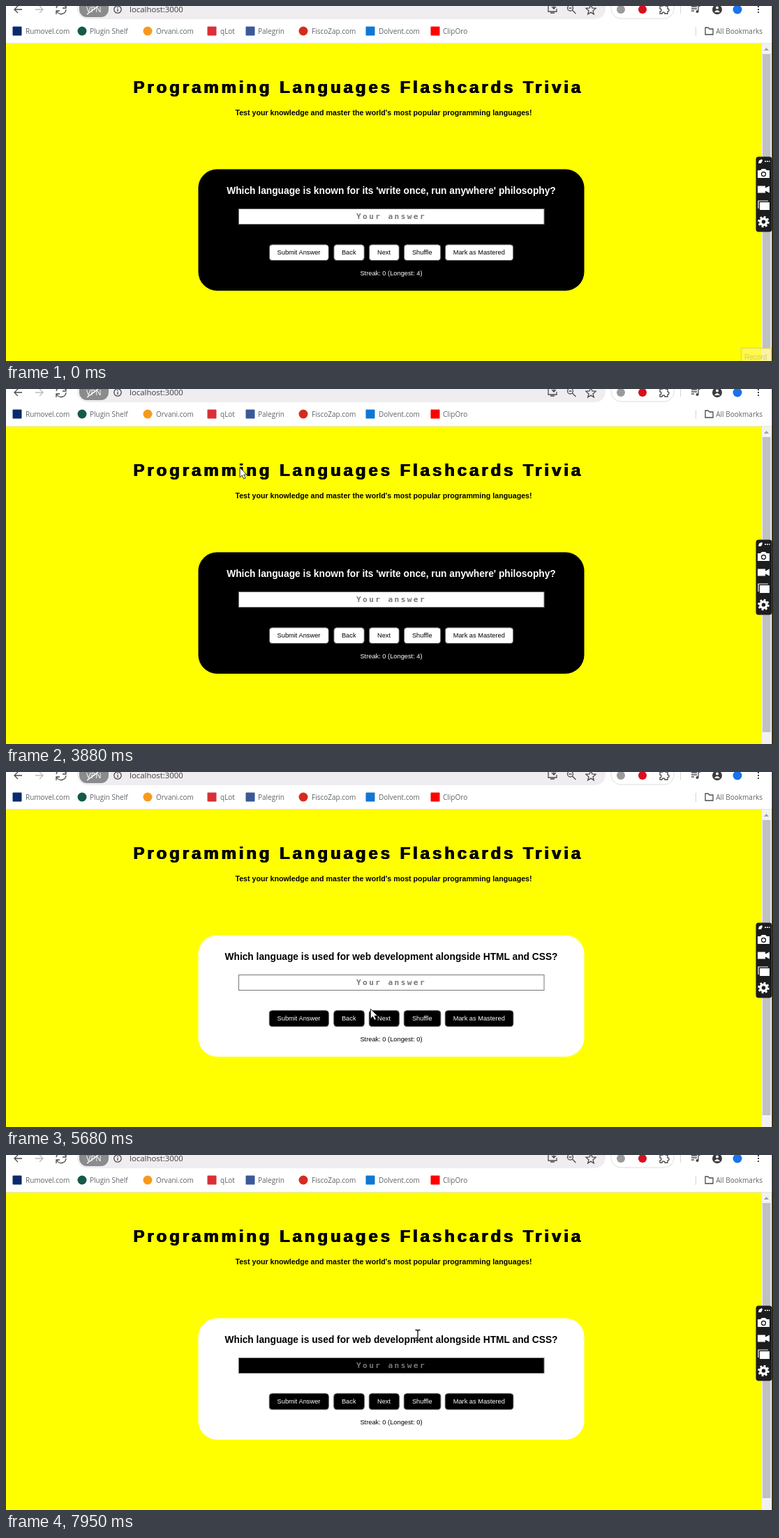
An HTML page that plays this animation: 1099 by 510 pixels, repeating every 8000 ms.

```html
<!DOCTYPE html>
<html lang="en">
<head>
<meta charset="utf-8">
<title>Programming Languages Flashcards Trivia</title>
<style>
  html, body { margin: 0; height: 100%; overflow: hidden; background: #ff0; }
  svg { display: block; width: 100vw; height: 100vh; }
  text { font-family: "Liberation Sans", Arial, sans-serif; white-space: pre; }
  .ui text { font: 10px "Open Sans", "Noto Sans", sans-serif; fill: #5f6368; }
  .ui .url { font-size: 11.4px; fill: #3c3c40; }
  .line { fill: none; stroke: #4a4a4e; stroke-width: 1.3; }
  .pixel { font-family: "DejaVu Sans Mono", monospace; font-weight: bold; }
  #heading { font-size: 24px; letter-spacing: 3.91px; }
  #placeholder { font-size: 11.2px; letter-spacing: 2.36px; fill: #757575; }
  .bold { font-weight: bold; }
  .mid { text-anchor: middle; }
  #card { --back: #000; --ink: #fff; --edge: #444; }
  #card.lit { --back: #fff; --ink: #000; --edge: #555; }
  #card > rect { fill: var(--back); }
  #card > text { fill: var(--ink); }
  #question { font-size: 13.78px; }
  #streak, .button text { font-size: 9.27px; }
  .button rect { fill: var(--ink); stroke: var(--edge); }
  .button text { fill: var(--back); }
  #card #field { fill: #fff; stroke: #777; }
  #card.dark #field { fill: #000; }
  .tool { fill: #fff; }
</style>
</head>
<body>
<svg viewBox="0 0 1099 510">
  <rect width="1099" height="510" fill="#ff0"/>

  <g class="ui">
    <rect width="1099" height="54" fill="#fff"/>
    <path d="M0 53.5H1099" stroke="#e6e6e0"/>
    <rect x="102" y="-16" width="757" height="35" rx="15" fill="#efedf0"/>
    <rect x="105" y="-12" width="42" height="28" rx="11" fill="#8b8b8d"/>
    <text x="115" y="9" style="fill:#fff;font-size:11px">VPN</text>
    <path d="M116 12L136-3" stroke="#fff" stroke-width="1.4"/>
    <path class="line" d="M23 5H12M17 0L12 5l5 5"/>
    <path class="line" style="stroke:#bbb" d="M42 5H53M48 0l5 5-5 5"/>
    <path class="line" d="M72 3a7 7 0 0 1 13-2M86 5a7 7 0 0 1-13 3M86-2V3H81M72 12V7h5"/>
    <circle class="line" cx="160" cy="5" r="5.2"/>
    <path class="line" d="M160 4V8M160 1.5V3"/>
    <text class="url" x="177" y="9">localhost:3000</text>
    <path class="line" d="M780-1h-3V8h12V4M780 10h6M785-3V4M782 1l3 3 3-3"/>
    <circle class="line" cx="808.5" cy="3" r="4"/>
    <path class="line" d="M811.500 6l5 5M806.500 3h4"/>
    <path class="line" d="M838-2l2 5 5 .4-4 3.500 1.300 5-4.300-2.800-4.300 2.800 1.300-5-4-3.500 5-.4z"/>
    <rect x="867" y="-14" width="90" height="32" rx="14" fill="none" stroke="#ddd"/>
    <circle cx="881" cy="5" r="6" fill="#9a9a9c"/>
    <circle cx="912" cy="5" r="6" fill="#d80f1e"/>
    <path class="line" d="M937 0h4a2 2 0 0 1 4 0h3v4a2 2 0 0 1 0 4v3h-4a2 2 0 0 0-4 0h-3V8a2 2 0 0 0 0-4z"/>
    <path d="M966.5 0V11M988.5 30V43" stroke="#d5d5d8"/>
    <path class="line" d="M982 1h8M982 4h8M982 7h4M992 8V0h3"/>
    <circle cx="990.500" cy="8" r="2" fill="#4a4a4e"/>
    <circle cx="1019" cy="5" r="7" fill="#3b3b3e"/>
    <circle cx="1019" cy="2.500" r="2" class="tool"/>
    <path class="tool" d="M1015 9q4-6 8 0z"/>
    <circle cx="1048" cy="5" r="6.500" fill="#1a73e8"/>
    <path d="M1077 0h2v2h-2zM1077 4h2v2h-2zM1077 8h2v2h-2z" fill="#444"/>
    <g id="bookmarks"></g>
    <path class="line" d="M1002 41V31h4l2 2h5v8z"/>
    <text x="1084" y="39.500" text-anchor="end">All Bookmarks</text>
  </g>

  <rect x="1083" y="54" width="14" height="456" fill="#f1f1f1"/>
  <rect x="1084" y="69" width="11.500" height="424" fill="#c1c1c1"/>
  <path d="M1086 64l3.500-4 3.500 4z" fill="#a0a0a0"/>
  <rect x="1097.500" width="1.500" height="510" fill="#111"/>

  <g id="title" class="pixel">
    <text id="heading" x="182.500" y="125">Programming Languages Flashcards Trivia</text>
    <use href="#heading" x=".6"/><use href="#heading" x="-.6"/>
  </g>
  <text id="subtitle" class="bold mid" x="541" y="157" font-size="10.67">Test your knowledge and master the world's most popular programming languages!</text>

  <g id="card">
    <rect x="275.500" y="234.500" width="553" height="174.500" rx="27"/>
    <text id="question" class="bold mid" x="552" y="270"></text>
    <rect id="field" x="333.500" y="291.500" width="437.500" height="22"/>
    <text id="placeholder" class="pixel" x="502" y="306" style="fill:#777">Your answer</text>
    <g id="buttons"></g>
    <text id="streak" class="mid" x="552" y="386.500"></text>
  </g>

  <g id="record">
    <rect x="1053.500" y="491.500" width="43" height="22" fill="#fff67a" fill-opacity=".6" stroke="#ddd36a"/>
    <text x="1058" y="508" font-size="10" fill="#d6c95c">Record</text>
  </g>
  <rect x="1074.500" y="216.500" width="23" height="108" rx="4" fill="#1d1d1f"/>
  <g class="tool">
    <path d="M1078 226l1-4 4-2 1 2-2 4zM1087 222.500h2v1.500h-2zM1090 222.500h2v1.500h-2zM1093 222.500h1.500v1.500h-1.500z"/>
    <path d="M1077 236h4l2-2h5l2 2h4v11h-17z"/>
    <circle cx="1085.500" cy="241.500" r="3" stroke="#1d1d1f" stroke-width="1.300"/>
    <path d="M1077 258.500h11v3l6-3v10l-6-3v3h-11z"/>
    <path d="M1080 282h14v11h-14z"/>
    <path d="M1078 291V280h14" fill="none" stroke="#fff" stroke-width="1.200"/>
    <circle cx="1085.500" cy="310" r="4.500" fill="none" stroke="#fff" stroke-width="3.500"/>
    <circle cx="1085.500" cy="310" r="7" fill="none" stroke="#fff" stroke-width="2.500" stroke-dasharray="2.800 2.700"/>
  </g>

  <g id="cursor">
    <path id="arrow" d="M0 0V14L3.200 11 5.600 16 8 15 5.700 10H10Z" fill="#fff" stroke="#222" stroke-width=".9"/>
    <g id="beam" fill="none">
      <path d="M-3.500-7.500H-1L0-6.500 1-7.500H3.500M0-6.500V6.500M-3.500 7.500H-1L0 6.500 1 7.500H3.500" stroke="#fff" stroke-width="2.400" opacity=".6"/>
      <path d="M-3.500-7.500H-1L0-6.500 1-7.500H3.500M0-6.500V6.500M-3.500 7.500H-1L0 6.500 1 7.500H3.500" stroke="#111" stroke-width="1.300"/>
    </g>
  </g>
</svg>
<script>
const LOOP = 8000;
const $ = id => document.getElementById(id);

// label, icon centre, text start, colour, round icon
const bookmarks = [
  ["Rumovel.com", 16, 28, "#0a2a6e"],
  ["Plugin Shelf", 109, 120, "#14594a", true],
  ["Orvani.com", 203, 215, "#f79a1c", true],
  ["qLot", 295, 307, "#d93036"],
  ["Palegrin", 350, 361, "#3b5998"],
  ["FiscoZap.com", 426, 438, "#d52b1e", true],
  ["Dolvent.com", 522, 534, "#0f78d4"],
  ["ClipOro", 615, 626, "#f00"],
];
$("bookmarks").innerHTML = bookmarks.map(([label, cx, x, color, round]) =>
  `<rect x="${cx - 6.5}" y="29.5" width="13" height="13" rx="${round ? 6.5 : 1}" fill="${color}"/>
   <text x="${x}" y="39.5">${label}</text>`).join("");

const buttons = [["Submit Answer", 377, 85], ["Back", 469.5, 43.5], ["Next", 520, 43],
  ["Shuffle", 570, 52.5], ["Mark as Mastered", 629, 97.5]];
$("buttons").innerHTML = buttons.map(([label, x, w]) =>
  `<g class="button"><rect x="${x + .3}" y="342.8" width="${w}" height="22.8" rx="4"/>
   <text class="mid" x="${x + w / 2}" y="357">${label}</text></g>`).join("");

// time, x, y of the pointer
const path = [
  [70, 1078, 495], [130, 872, 407], [210, 700, 333], [360, 690, 330], [480, 300, 247], [560, 127, 171],
  [800, 12, 85], [1150, 72, 8], [1220, 72, 8], [1290, 76, 4], [1430, 76, 4],
  [1840, 170, 50], [2020, 170, 50], [2160, 90, -7], [2680, 72, 3], [2830, 72, 3],
  [3000, 76, 2], [3170, 76, 2], [3500, 200, 52], [3880, 335, 113], [4020, 350, 117],
  [4300, 480, 125], [4600, 620, 222], [4800, 659, 274], [4870, 659, 274],
  [4940, 655, 290], [5140, 655, 291], [5280, 632, 291], [5540, 632, 291],
  [5720, 492, 354], [6080, 515, 91], [6220, 519, 121], [6350, 519, 121],
  [6550, 524, 128], [6810, 524, 128], [6880, 530, 146], [7070, 530, 148],
  [7200, 540, 153], [7470, 540, 153], [7720, 575, 302], [7950, 590, 259],
];

const ramp = (t, a, b) => Math.min(1, Math.max(0, (t - a) / (b - a)));
const pulse = (t, a, b, c, d) => ramp(t, a, b) * (1 - ramp(t, c, d));
const within = (v, a, b) => v >= a && v < b;

function pointerAt(t) {
  const i = path.findIndex(p => p[0] > t);
  if (i === 0) return path[0].slice(1);
  if (i < 0) return path[path.length - 1].slice(1);
  const [t0, x0, y0] = path[i - 1], [t1, x1, y1] = path[i];
  const k = ramp(t, t0, t1);
  return [x0 + (x1 - x0) * k, y0 + (y1 - y0) * k];
}

function setGlow(id, amount, radius) {
  const shadow = `drop-shadow(0 0 ${radius}px rgba(255,255,255,${amount}))`;
  $(id).style.filter = amount ? shadow + shadow : "none";
}

function draw(t) {
  const [x, y] = pointerAt(t);
  const overCard = t >= 70 && within(x, 275, 829) && within(y, 234, 409);
  const overText = within(y, 104, 132) || within(y, 146, 161) || within(y, 252, 314);
  const reloaded = t >= 3960;
  const beam = reloaded && overText;

  $("cursor").setAttribute("transform", `translate(${x} ${y})`);
  $("cursor").style.display = t < 70 ? "none" : "";
  $("beam").style.display = beam ? "" : "none";
  $("arrow").style.display = beam ? "none" : "";
  $("record").style.opacity = 1 - ramp(t, 70, 210);

  $("card").classList.toggle("lit", overCard);
  $("card").classList.toggle("dark", overCard && (within(t, 4920, 5620) || t >= 7690));
  $("question").textContent = reloaded
    ? "Which language is used for web development alongside HTML and CSS?"
    : "Which language is known for its 'write once, run anywhere' philosophy?";
  $("streak").textContent = `Streak: 0 (Longest: ${reloaded ? 0 : 4})`;

  setGlow("title", pulse(t, 4020, 4250, 4380, 4720) + pulse(t, 6060, 6220, 6790, 6880), 4);
  setGlow("subtitle", pulse(t, 7060, 7200, 7470, 7600), 2.5);
}

function tick() {
  draw(performance.now() % LOOP);
  requestAnimationFrame(tick);
}
tick();
</script>
</body>
</html>
```
